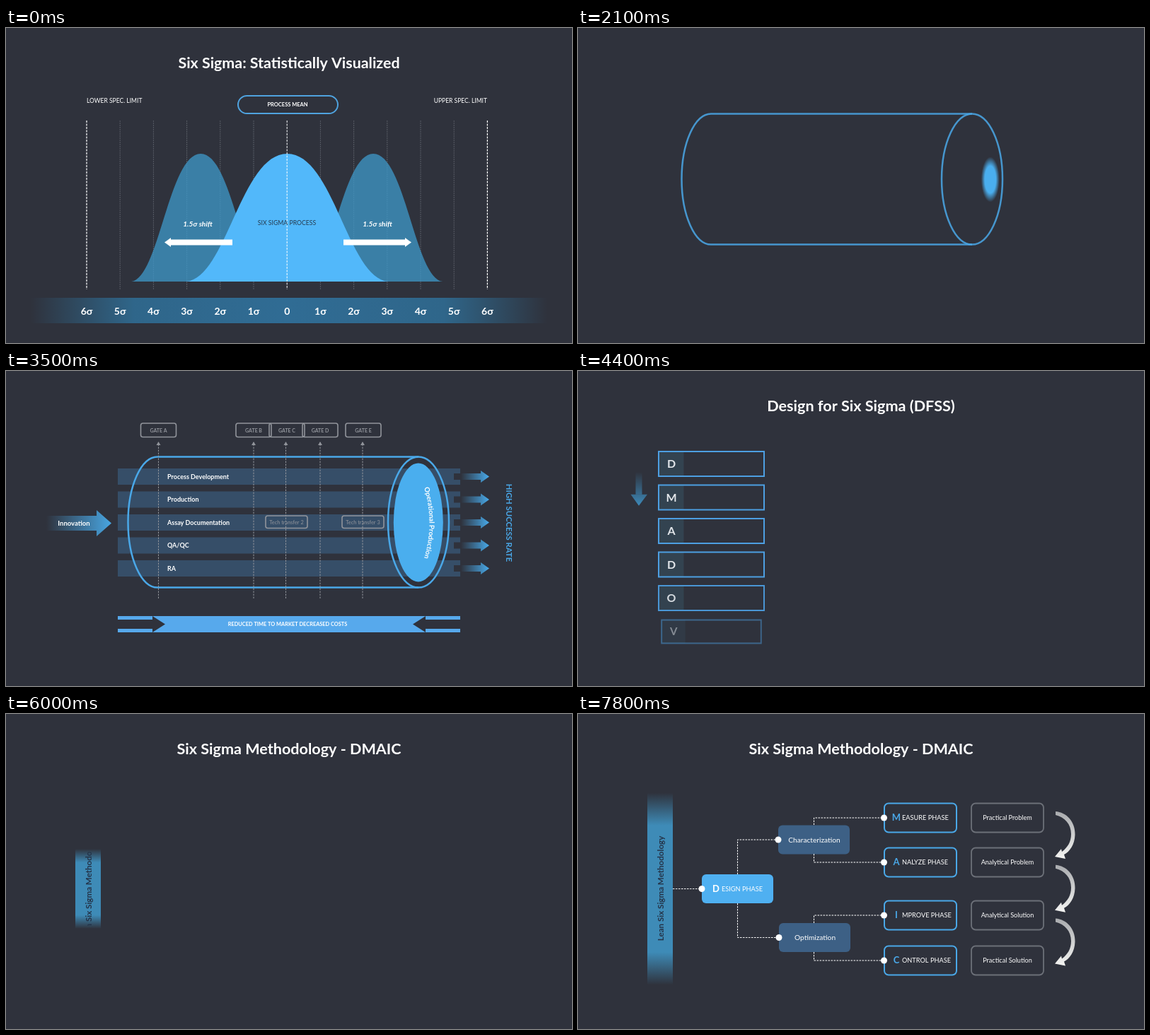
Animation, 800 px wide and 446 px high, one loop 8 s. Source, as an HTML page with a canvas:

```html
<!DOCTYPE html>
<html lang="en">
<head>
<meta charset="utf-8">
<title>Six Sigma slides</title>
<style>
html, body { margin: 0; height: 100%; overflow: hidden; background: #2f323c; }
canvas { display: block; width: 100vw; height: 100vh; }
</style>
</head>
<body>
<canvas id="stage" width="800" height="446"></canvas>
<script>
const ctx = document.getElementById('stage').getContext('2d');
const LOOP = 8000, STEP = 100;
const BG = '#2f323c', BLUE = '#4aa8e8', WHITE = '#fff', GRAY = '#91949b';
const PANEL = 'rgba(70,144,204,.3)';
const FONT = 'Lato, "Noto Sans", sans-serif';

const clamp = v => Math.max(0, Math.min(1, v));
const prog = (t, start, dur) => clamp((t - start) / dur);
const out = p => 1 - (1 - p) ** 3;
const inOut = p => p < .5 ? 4 * p ** 3 : 1 - (2 - 2 * p) ** 3 / 2;
const mix = (a, b, p) => a + (b - a) * p;
const rad = deg => deg * Math.PI / 180;

function layer(alpha, draw) {
  if (alpha <= 0) return;
  ctx.save();
  ctx.globalAlpha *= alpha;
  draw();
  ctx.restore();
}

function pop(p, x, y, draw) {
  layer(p, () => {
    const s = mix(.6, 1, out(p));
    ctx.translate(x, y);
    ctx.scale(s, s);
    ctx.translate(-x, -y);
    draw();
  });
}

function text(str, x, y, size, { color = WHITE, align = 'center', style = 'bold', turn = 0 } = {}) {
  ctx.save();
  ctx.translate(x, y);
  ctx.rotate(turn);
  ctx.font = `${style} ${size}px ${FONT}`;
  ctx.textAlign = align;
  ctx.fillStyle = color;
  ctx.fillText(str, 0, size * .36);
  ctx.restore();
}

function rect(x, y, w, h, color) {
  ctx.fillStyle = color;
  ctx.fillRect(x, y, w, h);
}

function round(x, y, w, h, r, { fill, stroke, width = 2 }) {
  ctx.beginPath();
  ctx.roundRect(x, y, w, h, r);
  if (fill) { ctx.fillStyle = fill; ctx.fill(); }
  if (stroke) { ctx.strokeStyle = stroke; ctx.lineWidth = width; ctx.stroke(); }
}

function poly(points, color) {
  ctx.beginPath();
  points.forEach(p => ctx.lineTo(...p));
  ctx.closePath();
  ctx.fillStyle = color;
  ctx.fill();
}

// Arrow pointing along +x from (x, y); dir -1 mirrors it.
function arrow(x, y, len, half, headLen, headHalf, color, dir = 1) {
  const neck = x + dir * (len - headLen);
  poly([[x, y - half], [neck, y - half], [neck, y - headHalf], [x + dir * len, y],
    [neck, y + headHalf], [neck, y + half], [x, y + half]], color);
}

function linear(x0, y0, x1, y1, ...stops) {
  const g = ctx.createLinearGradient(x0, y0, x1, y1);
  stops.forEach(([at, color]) => g.addColorStop(at, color));
  return g;
}

// Dashed polyline drawn up to the share p of its length.
function dashes(points, p, color = WHITE, width = 1, dash = [2.5, 1.5]) {
  if (p <= 0) return;
  const lengths = points.slice(1).map((q, i) => Math.hypot(q[0] - points[i][0], q[1] - points[i][1]));
  let left = p * lengths.reduce((a, b) => a + b);
  ctx.save();
  ctx.beginPath();
  ctx.moveTo(...points[0]);
  lengths.forEach((len, i) => {
    const f = clamp(left / len);
    if (f) ctx.lineTo(mix(points[i][0], points[i + 1][0], f), mix(points[i][1], points[i + 1][1], f));
    left -= len;
  });
  ctx.setLineDash(dash);
  ctx.strokeStyle = color;
  ctx.lineWidth = width;
  ctx.stroke();
  ctx.restore();
}

const title = (str, size = 21.6) => text(str, 400, 49, size);

function bell(cx, half, color) {
  const top = 178, base = 359;
  ctx.beginPath();
  ctx.moveTo(cx - half, base);
  ctx.bezierCurveTo(cx - half * .6, base - 4, cx - half * .46, top, cx, top);
  ctx.bezierCurveTo(cx + half * .46, top, cx + half * .6, base - 4, cx + half, base);
  ctx.fillStyle = color;
  ctx.fill();
}

function curvesSlide() {
  title('Six Sigma: Statistically Visualized', 21.4);
  text('LOWER SPEC. LIMIT', 114, 103, 8.5, { align: 'left', style: '' });
  text('UPPER SPEC. LIMIT', 680, 103, 8.5, { align: 'right', style: '' });
  round(328, 96, 141, 25, 12.5, { stroke: '#4fa3df' });
  text('PROCESS MEAN', 398, 108.5, 7.5);

  rect(35, 382, 730, 36, linear(35, 0, 765, 0,
    [0, 'rgba(47,106,144,0)'], [.2, '#2f668a'], [.5, '#306c94'], [.8, '#2f668a'], [1, 'rgba(47,106,144,0)']));
  for (let i = -6; i <= 6; i++) {
    const x = 397.2 + i * 47.2;
    text(i ? Math.abs(i) + 'σ' : '0', x, 401, 14);
    if (Math.abs(i) === 6) dashes([[x, 131], [x, 370]], 1, WHITE, 1.2, [3, 1.5]);
    else if (i) dashes([[x, 131], [x, 370]], 1, 'rgba(150,155,165,.4)', 1, [2, 1]);
  }
  for (const dir of [-1, 1]) bell(397.2 + dir * 122, 98, 'rgba(62,152,202,.75)');
  bell(397.5, 143, '#52b8fa');
  dashes([[397.2, 131], [397.2, 370]], 1, WHITE, 1, [3, 1.5]);
  text('SIX SIGMA PROCESS', 397, 275.5, 8.7, { color: '#263c50', style: '' });
  for (const dir of [-1, 1]) {
    text('1.5σ shift', 398 + dir * 127, 277, 10.3, { style: 'italic bold' });
    arrow(398.5 + dir * 78.5, 303.5, 96, 4, 9, 6.5, WHITE, dir);
  }
}

// Letter, head angle and gradient tilt of a wheel part, then the texts of its bars.
const STEPS = [
  ['D', -93, 50, 'Define the problem', 'Project charter'],
  ['M', -16.5, 0, 'Measure performance', 'Data collection'],
  ['A', 51.5, 50, 'Analyze root causes', 'Cause analysis'],
  ['I', 127.5, 0, 'Improve the process', 'Solution testing'],
  ['C', 200, 0, 'Control the results', 'Control plan']
];

function wheelPart(tilt, alpha) {
  const tail = rad(-52), dx = Math.sin(rad(tilt)), dy = Math.cos(rad(tilt));
  ctx.beginPath();
  ctx.arc(0, 0, 135.5, tail, 0);
  ctx.arc(97.7, 0, 37.7, 0, Math.PI);
  ctx.arc(0, 0, 60, 0, tail, true);
  ctx.closePath();
  ctx.fillStyle = linear(98 + dx * 55, dy * 55 - 20, 98 - dx * 78, -20 - dy * 78,
    [0, `rgba(74,172,236,${alpha})`], [1, 'rgba(60,135,180,0)']);
  ctx.fill();
}

function roadmapSlide(t) {
  title('Six Sigma Roadmap', 22.5);
  pop(prog(t, 230, 400), 400, 247, () => STEPS.forEach(([, angle, tilt], i) => {
    ctx.save();
    ctx.translate(400, 247.5);
    ctx.rotate(rad(angle));
    wheelPart(tilt, i ? 1 : .85);
    ctx.restore();
  }));
  STEPS.forEach(([letter, angle, , left, right], i) => {
    const w = 198.5 * inOut(prog(t, 437 + i * 53, 250));
    const y = Math.round(208 + i * 25.2);
    rect(0, y, w, 21.3, PANEL);
    if (w) rect(797.5 - w, y, w + 2.5, 21.3, PANEL);
    const x = 400 + 97 * Math.cos(rad(angle)), cy = 247 + 97 * Math.sin(rad(angle));
    pop(prog(t, 1080 + i * 70, 200), x, cy, () => text(letter, x, cy, 26));
    layer(prog(t, 1150 + i * 70, 220), () => {
      text(left, 99, y + 10.5, 9, { style: '' });
      text(right, 700, y + 10.5, 9, { style: '' });
    });
  });
}

function arcText(str, cx, cy, r, size) {
  ctx.font = `bold ${size}px ${FONT}`;
  const widths = [...str].map(c => ctx.measureText(c).width);
  let pos = -widths.reduce((a, b) => a + b) / 2;
  [...str].forEach((c, i) => {
    const a = (pos + widths[i] / 2) / r;
    text(c, cx + r * Math.cos(a), cy + r * Math.sin(a), size, { turn: a + Math.PI / 2 });
    pos += widths[i];
  });
}

const LANES = ['Process Development', 'Production', 'Assay Documentation', 'QA/QC', 'RA'];
const GATES = [[215.5, 215.5], [350, 350], [397, 395.5], [444, 444], [505, 504]];

function cylinder(shift) {
  ctx.save();
  ctx.translate(shift, 0);
  ctx.strokeStyle = BLUE;
  ctx.lineWidth = 2.5;
  ctx.beginPath();
  ctx.moveTo(583, 306.5);
  ctx.lineTo(214, 306.5);
  ctx.ellipse(214, 214, 41.5, 92.5, 0, Math.PI / 2, Math.PI * 1.5);
  ctx.lineTo(583, 121.5);
  ctx.stroke();
  ctx.beginPath();
  ctx.ellipse(583, 214, 43, 92.5, 0, 0, 7);
  ctx.stroke();
  ctx.restore();
}

function core(p) {
  const soft = .4 * (1 - p);
  ctx.save();
  ctx.translate(582.8, 214.5);
  ctx.scale(mix(13, 35, p), mix(32, 84, p));
  const g = ctx.createRadialGradient(0, 0, 0, 0, 0, 1);
  g.addColorStop(1 - soft, '#4aaeee');
  g.addColorStop(1, soft ? 'rgba(74,174,238,0)' : '#4aaeee');
  ctx.beginPath();
  ctx.arc(0, 0, 1, 0, 7);
  ctx.fillStyle = g;
  ctx.fill();
  ctx.restore();
}

function costBar(p) {
  layer(p, () => {
    const half = 242 * out(p);
    ctx.beginPath();
    ctx.rect(400 - half, 340, half * 2, 40);
    ctx.clip();
    rect(158, 347, 484, 23, '#57a9ec');
    arrow(157, 358.5, 68, 6.5, 18, 11.5, BG);
    arrow(643, 358.5, 68, 6.5, 18, 11.5, BG, -1);
    text('REDUCED TIME TO MARKET DECREASED COSTS', 398, 358, 7.4);
  });
}

function pipelineSlide(t) {
  LANES.forEach((name, i) => {
    const y = 138 + i * 32.5;
    rect(158, y, 484 * inOut(prog(t, 2180 + i * 50, 300)), 23, PANEL);
    layer(prog(t, 2450 + i * 50, 200), () => text(name, 228, y + 11.5, 9, { align: 'left' }));
  });
  layer(mix(.85, 1, prog(t, 2100, 200)), () => cylinder(-26 * (1 - inOut(prog(t, 2100, 400)))));
  core(inOut(prog(t, 2100, 400)));
  layer(prog(t, 2450, 250), () => arcText('Operational Production', 430, 215, 172, 9.8));

  layer(prog(t, 2250, 250), () => {
    ctx.translate(-30 * (1 - out(prog(t, 2250, 300))), 0);
    arrow(57, 215.5, 92, 10.5, 21, 18.5, linear(57, 0, 149, 0, [0, 'rgba(74,168,232,0)'], [1, '#48a6e2']));
    text('Innovation', 96, 215.5, 9.5);
  });

  GATES.forEach(([boxX, x], i) => {
    const p = prog(t, 2400 + i * 60, 250);
    dashes([[x, 322], [x, 101]], p, GRAY, 1, [2.5, 1.5]);
    layer(prog(p, .7, .3), () => {
      poly([[x, 100], [x + 3, 105], [x - 3, 105]], GRAY);
      round(boxX - 25, 74, 50, 19.5, 3, { stroke: GRAY, width: 1.6 });
      text('GATE ' + 'ABCDE'[i], boxX, 84, 7, { color: GRAY });
    });
  });
  [396.5, 504.5].forEach((x, i) => pop(prog(t, 3050 + i * 50, 200), x, 214, () => {
    round(x - 29.5, 205, 59, 17.5, 3, { stroke: GRAY, width: 1.6 });
    text('Tech transfer ' + (i + 2), x, 214, 7.4, { color: GRAY, style: '' });
  }));
  LANES.forEach((_, i) => layer(prog(t, 3050 + i * 40, 200), () =>
    arrow(633, 149.5 + i * 32.5, 50 * out(prog(t, 3050 + i * 40, 240)), 4.5, 12, 8.5,
      linear(633, 0, 683, 0, [0, BG], [.2, BG], [1, '#48aaea']))));
  costBar(prog(t, 3080, 400));
  layer(prog(t, 3200, 300), () =>
    text('HIGH SUCCESS RATE', 711, 215, 11.3, { color: BLUE, turn: Math.PI / 2 }));
}

const DESIGN = [
  ['Define', 'Define project goals', 'Customer analysis/|risk assessment', 'Assemble team'],
  ['Measure', 'Capture vice of customer', 'Determine project schedule', 'Determine risk assessment'],
  ['Analyze', 'Develop CTQ’s', 'Review project schedule', 'Review risk assessment'],
  ['Design', 'Develop models', 'Determine CTQ’s'],
  ['Optimize', 'Review CTQ’s', 'Tolerance testing', 'Design optimization'],
  ['Verify', 'Product comparison against|initial specifications', 'Document development']
];

function designSlide(t) {
  title('Design for Six Sigma (DFSS)');
  const grow = inOut(prog(t, 4200, 650));
  layer(prog(t, 4200, 100), () => {
    const tip = mix(165, 386, grow);
    const fade = linear(0, 143, 0, tip, [0, 'rgba(61,138,186,0)'], [1, '#3d8aba']);
    rect(81.5, 143, 9, tip - 159, fade);
    poly([[74.5, tip - 16], [98, tip - 16], [86, tip]], fade);
  });
  const slide = inOut(prog(t, 4690, 790));
  DESIGN.forEach(([word, ...cells], row) => {
    const y = 114 + row * 47.5;
    pop(prog(t, 3730 + row * 110, 250), 188, y + 17, () => {
      rect(114, y, 35.5, 35, 'rgba(74,150,180,.17)');
      round(114, y, 149, 35, 0, { stroke: '#4d9fe2' });
      text(word[0], 132, y + 17.5, 16, { color: '#e2e6ea' });
    });
    layer(prog(t, 5150 + row * 40, 150), () => text(word, 206, y + 17.5, 10));
    const w = cells.length === 3 ? 153 : 225;
    const pitch = cells.length === 3 ? 154.5 : 231;
    layer(prog(t, 4690, 250), () => cells.forEach((cell, i) => {
      const x = mix(773, 265 + i * pitch, slide);
      rect(x, y - .5, w, 35, PANEL);
      const lines = cell.split('|');
      lines.forEach((line, n) => text(line, x + w / 2, y + 17 + (n - (lines.length - 1) / 2) * 10, 8.2, { style: '' }));
    }));
  });
}

const dot = (x, y) => round(x - 4.5, y - 4.5, 9, 9, 4.5, { fill: WHITE });

function sidebar(p) {
  const half = mix(56.5, 136, p), top = 247.5 - half, bottom = 247.5 + half;
  const faded = rgb => linear(0, top, 0, bottom,
    [0, `rgba(${rgb},0)`], [.17, `rgba(${rgb},1)`], [.83, `rgba(${rgb},1)`], [1, `rgba(${rgb},0)`]);
  rect(98, top, 36, half * 2, faded('62,139,183'));
  ctx.save();
  ctx.beginPath();
  ctx.rect(98, top + half * .08, 36, half * 1.84);
  ctx.clip();
  text('Lean Six Sigma Methodology', 117, 247, 11.6, { color: '#243348', turn: -Math.PI / 2 });
  ctx.restore();
}

function capped(letter, rest, x, y, color) {
  text(letter, x, y, 13, { color });
  text(rest, x + 8, y + .5, 9.2, { align: 'left', style: '' });
}

const PHASES = [
  ['M', 'EASURE PHASE', 'Practical Problem', 147, 157],
  ['A', 'NALYZE PHASE', 'Analytical Problem', 210, 198],
  ['I', 'MPROVE PHASE', 'Analytical Solution', 285, 296],
  ['C', 'ONTROL PHASE', 'Practical Solution', 349, 337]
];

function hook(y) {
  ctx.save();
  ctx.translate(0, y);
  ctx.fillStyle = linear(0, 138, 0, 205, [0, '#a9abae'], [1, '#f4f4f2']);
  ctx.fill(new Path2D('M675 138C690 139 703 152 702.500 171C702 185 695 195 687 199L689 205L674 202L683 191L684 195C692 189 697 181 697 170C697 156 688 146 675 143Z'));
  ctx.restore();
}

function methodSlide(t) {
  title('Six Sigma Methodology - DMAIC');
  sidebar(inOut(prog(t, 6000, 400)));
  dashes([[134, 247.5], [175, 247.5]], prog(t, 6250, 200));
  pop(prog(t, 6380, 250), 225, 247, () => {
    round(175, 227, 101, 41, 6, { fill: '#4fb0f1' });
    capped('D', 'ESIGN PHASE', 195, 247.5, WHITE);
    dot(175, 247.5);
  });
  [[283, 178, 227, 'Characterization'], [284, 316.5, 268, 'Optimization']].forEach(([x, y, from, name]) => {
    dashes([[225.5, from], [225.5, y], [x, y]], prog(t, 6600, 330));
    pop(prog(t, 6820, 250), x + 50, y, () => {
      round(x, y - 20.5, 101, 41, 6, { fill: '#3d6085' });
      text(name, x + 51, y, 10.2, { style: '' });
      dot(x, y);
    });
  });
  PHASES.forEach(([letter, rest, goal, y, from], i) => {
    dashes([[333.5, from], [333.5, y], [432, y]], prog(t, 7000, 250));
    pop(prog(t, 7130 + i * 50, 250), 483, y, () => {
      round(433, y - 20.5, 102, 41, 6, { stroke: BLUE });
      capped(letter, rest, 450, y - .5, BLUE);
      dot(432.5, y);
    });
    pop(prog(t, 7330 + i * 70, 250), 607, y, () => {
      round(556, y - 20.5, 102, 41, 6, { stroke: '#6c7078', width: 1.8 });
      text(goal, 607, y, 9.1, { style: '' });
    });
    if (i < 3) layer(prog(t, 7400 + i * 50, 200), () => hook(i * 75.7));
  });
}

const SLIDES = [[6000, methodSlide], [3800, designSlide], [2100, pipelineSlide], [300, roadmapSlide], [0, curvesSlide]];

function render(now) {
  const t = Math.floor((now % LOOP) / STEP) * STEP;
  rect(0, 0, 800, 446, BG);
  SLIDES.find(([start]) => t >= start)[1](t);
}

let origin;
function frame(now) {
  origin ??= now;
  render(now - origin);
  requestAnimationFrame(frame);
}
requestAnimationFrame(frame);
</script>
</body>
</html>
```
